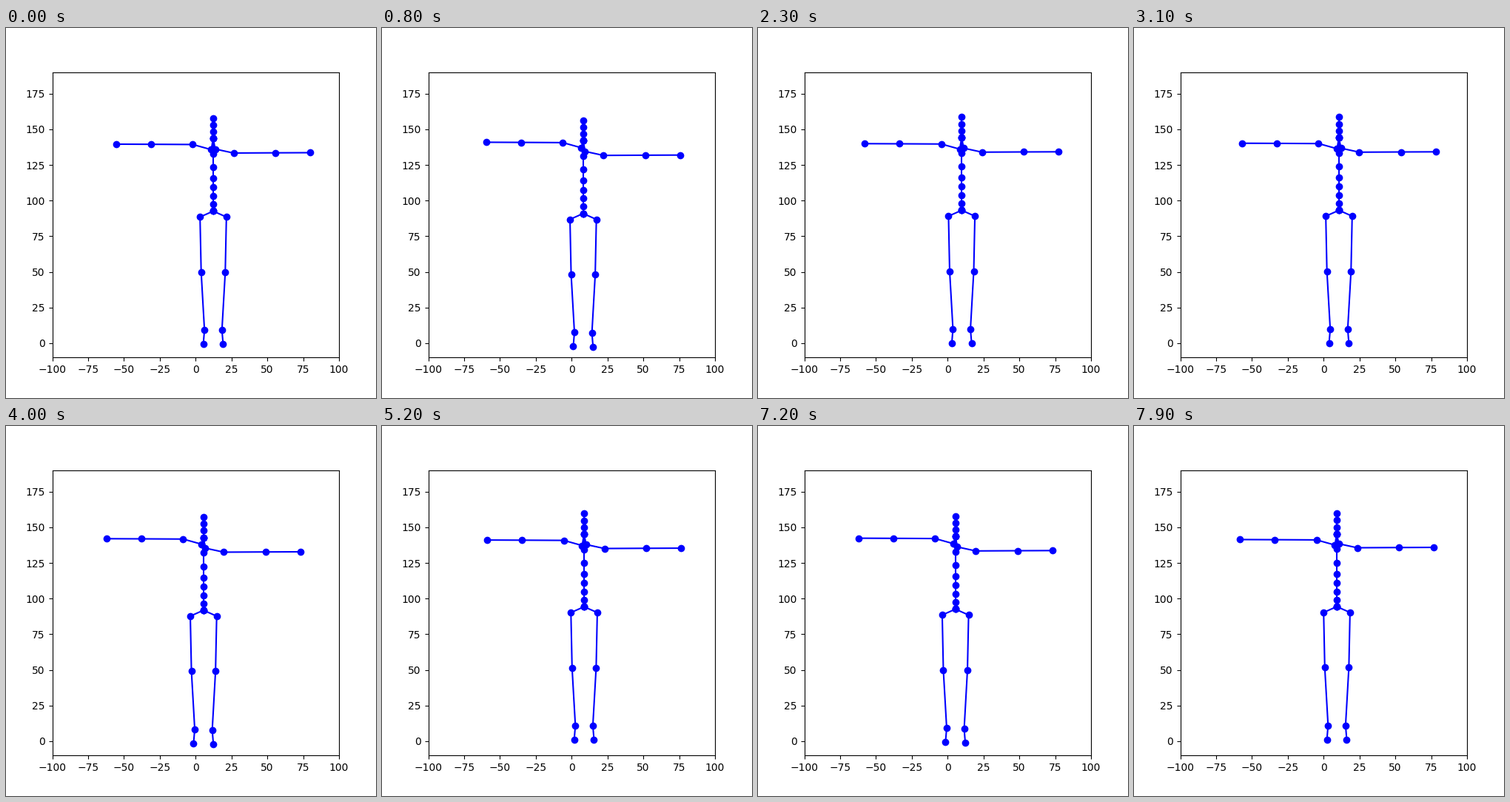
A matplotlib script that plays this animation: 500x500 px, repeating every 8 s.

```python
import numpy as np
import matplotlib.pyplot as plt
from matplotlib.animation import FuncAnimation

FRAMES = 80
INTERVAL = 100

# Hip path: frame, x, y
KEYS = [(0, 12.26, 92.6), (16, 11.3, 92.5), (26, 9.4, 93.4), (31, 10.7, 93.2),
        (48, 10.9, 94.5), (52, 8.7, 94.3), (64, 8.35, 93.65), (79, 9.2, 94.4)]
# Quick leans to the side: centre frame, shift, drop
LEANS = [(10.5, 9.4, 2.4), (41.2, 6.6, 2.3), (70.8, 4.2, 1.6)]

NECK = 51.1
BACK = [0, 4.8, 10.65, 16.7, 23, 30.8, 40.3]
HEAD = NECK + 4.76 * np.arange(4)


def bump(t, width):
    return np.exp(-(t / width) ** 2)


def hips(t):
    i = max(k for k in range(len(KEYS) - 1) if KEYS[k][0] <= t)
    start, end = np.array(KEYS[i]), np.array(KEYS[i + 1])
    u = (t - start[0]) / (end[0] - start[0])
    x, y = (start + (end - start) * u * u * (3 - 2 * u))[1:]
    for centre, shift, drop in LEANS:
        x -= shift * bump(t - centre, 2.6)
        y -= drop * bump(t - centre, 4)
    return x, y


def arm(side, collar, shoulder, lift):
    x = side * np.array([0, 1.35, 14.2, 43.4, 67.6])
    y = np.array([NECK, collar + lift, *(shoulder + lift + np.array([0, 0.15, 0.25]))])
    return np.column_stack([x, y])


def leg(side, drop=0):
    x = side * np.array([0, 9.2, 8.4, 6.1, 6.9])
    y = [0, -4.1, -42.8, -83.4 - drop, -93.3 - drop]
    return np.column_stack([x, y])


def pose(t):
    left = sum(3.5 * bump(t - c + 1, 6) for c, *_ in LEANS)
    right = sum(0.9 * bump(t - c - 6, 3) for c, *_ in LEANS)
    drop = sum(0.8 * bump(t - c, 3) for c, *_ in LEANS)
    spine = np.array([(0, y) for y in (*BACK, *HEAD)])
    chains = (spine, arm(-1, 42.9, 46.5, left), arm(1, 43.6, 40.8, right),
              leg(-1), leg(1, drop))
    return [c + hips(t) for c in chains]


fig, ax = plt.subplots(figsize=(5, 5), dpi=100)
fig.subplots_adjust(left=0.125, right=0.9, bottom=0.11, top=0.88)
ax.set_xlim(-100, 100)
ax.set_ylim(-10, 190)
ax.set_xticks(range(-100, 101, 25))
ax.set_yticks(range(0, 176, 25))
lines = [ax.plot([], [], "o-", color="blue", lw=1.5, ms=6)[0] for _ in range(5)]


def update(frame):
    for line, chain in zip(lines, pose(frame)):
        line.set_data(chain[:, 0], chain[:, 1])
    return lines


anim = FuncAnimation(fig, update, frames=FRAMES, interval=INTERVAL,
                     repeat=True, repeat_delay=0)
plt.show()
```
